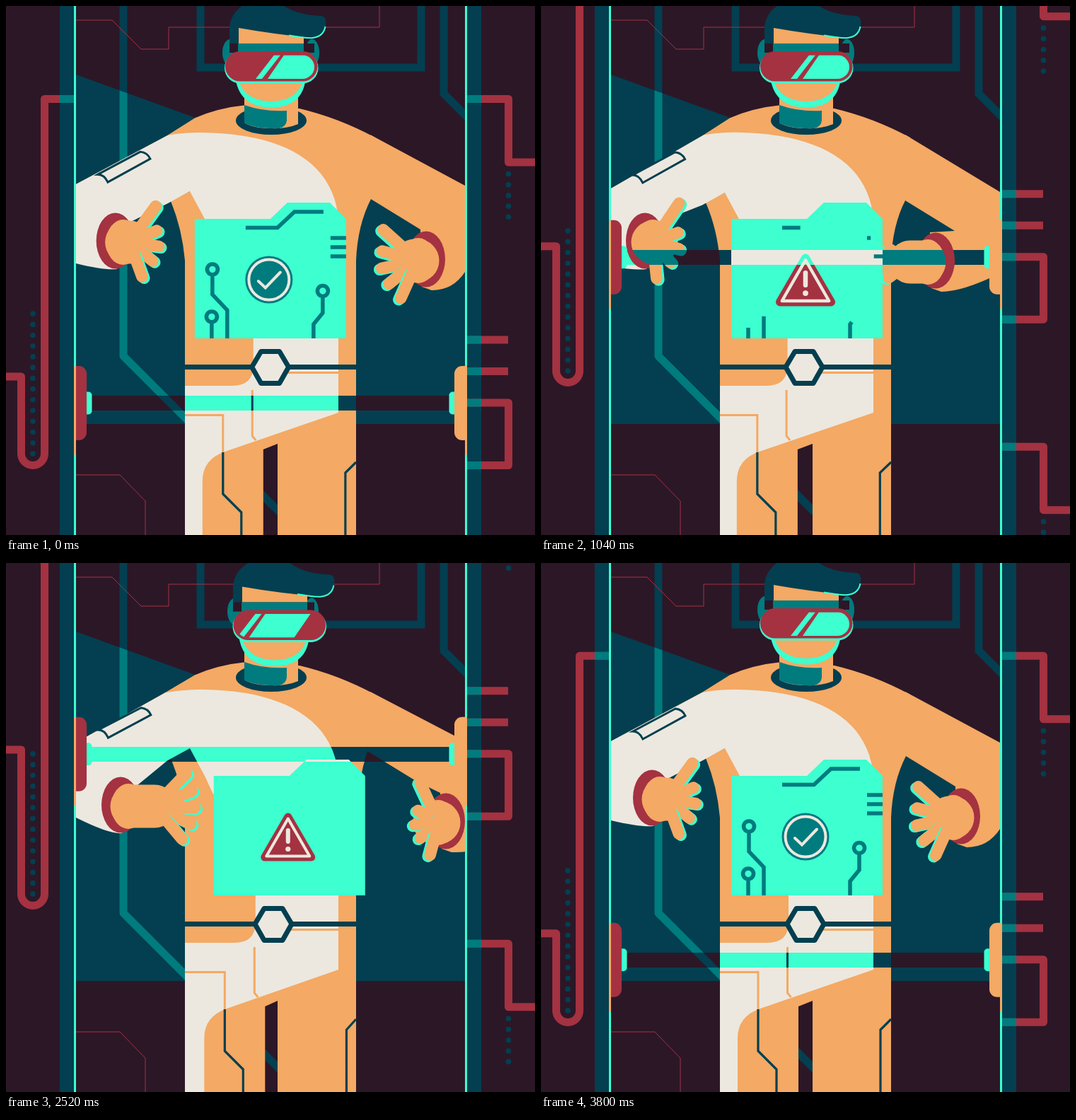
Write an HTML page with a canvas that moves like this. It is 748 px wide and 748 px high and loops after 3840 ms.

```html
<!DOCTYPE html>
<html lang="en">
<head>
<meta charset="utf-8">
<title>Scanner</title>
<style>
html, body { margin: 0; width: 100%; height: 100%; overflow: hidden; background: #2c1727; }
canvas { display: block; width: 748px; height: 748px; }
</style>
</head>
<body>
<canvas id="stage" width="748" height="748"></canvas>
<script>
const c = document.getElementById('stage').getContext('2d');
const LOOP = 3840, HALF = LOOP / 2;

const BASE = {
  bg: '#2c1727', dark: '#033f50', ink: '#033f50', teal: '#007b7e', pipe: '#007b7e',
  mint: '#3dffd0', rim: '#3dffd0', orange: '#f4a964', skin: '#f4a964',
  white: '#ece8df', mark: '#ece8df', red: '#a43241', sign: '#a43241'
};
// Colours as seen through the scan beam
const BEAM = { ...BASE, dark: BASE.bg, pipe: BASE.dark, white: BASE.mint, orange: BASE.dark,
  skin: BASE.teal, rim: BASE.teal, mint: BASE.white, sign: BASE.mint };
let P = BASE;

// Smooth 0 to 1 while u runs from a to b
function ramp(u, a, b) {
  const p = Math.min(1, Math.max(0, (u - a) / (b - a)));
  return p * p * (3 - 2 * p);
}

// cubic-bezier(.5, 0, .5, 1)
function ease(x) {
  let lo = 0, hi = 1;
  for (let i = 0; i < 24; i++) {
    const s = (lo + hi) / 2;
    if (1.5 * s * (1 - s) + s * s * s < x) lo = s; else hi = s;
  }
  return lo * lo * (3 - 2 * lo);
}

// State of one swipe cycle: rest, wind up, swipe, land, scan, rest
function pose(u) {
  const lean = ramp(u, -40, 150) - ramp(u, 150, 360);
  const swipe = ramp(u, 150, 360) - ramp(u, 360, 600);
  const land = ramp(u, 360, 600) - ramp(u, 600, 1040);
  const scan = ramp(u, 600, 1040) - ramp(u, 1040, 1270);
  const mix = (rest, a, b, d) => rest + (a - rest) * swipe + (b - rest) * land + (d - rest) * scan;
  return {
    slide: 500 * ramp(u, 150, 556) - 18 * ramp(u, -40, 150) - 26 * ramp(u, 556, 900),
    turn: ramp(u, 150, 330) - ramp(u, 640, 950),
    glint: 84 + 14 * ramp(u, 150, 360) - 52 * ramp(u, 380, 600) + 38 * ramp(u, 600, 1000),
    warn: 1 + .12 * ramp(u, 960, 1080) - 1.12 * ramp(u, 1080, 1160),
    check: 1.12 * ramp(u, 1130, 1230) - .12 * ramp(u, 1230, 1400),
    drawn: 1 - Math.pow(1 - Math.min(1, Math.max(0, (u - 940) / 780)), 1.75),
    hip: mix(0, 17, 4, -2) - 3 * lean,
    armL: { top: mix(252, 240, 254, 258), low: mix(364, 380, 360, 368), pit: [260, mix(262, 258, 262, 264)] },
    armR: { top: mix(254, 243, 252, 263), low: mix(376, 360, 405, 378),
      pit: [mix(516, 503, 511, 515), mix(273, 260, 266, 275)] },
    left: { x: mix(157, 205, 162, 147) - 20 * lean, y: mix(332, 362, 342, 332), palm: mix(20, 72, 48, 11),
      aim: mix(8, 14, 2, 14), spread: mix(31, 24, 24, 35), len: mix(42, 59, 57, 38) },
    right: { x: mix(594, 690, 622, 558), y: mix(358, 360, 365, 360), palm: mix(12, 14, 10, 36),
      aim: mix(12, 12, 5, 2), spread: mix(27, 27, 35, 17), len: mix(52, 50, 34, 40) }
  };
}

function fill(d, col) { c.fillStyle = P[col]; c.fill(new Path2D(d)); }
function stroke(d, col, w) { c.strokeStyle = P[col]; c.lineWidth = w; c.stroke(new Path2D(d)); }
function rect(x, y, w, h, col, r = 0) {
  c.fillStyle = P[col];
  c.beginPath(); c.roundRect(x, y, w, h, r); c.fill();
}
function oval(x, y, rx, ry, col) {
  c.fillStyle = P[col];
  c.beginPath(); c.ellipse(x, y, rx, ry, 0, 0, 7); c.fill();
}
function seg(x1, y1, x2, y2, col, w) {
  c.lineCap = 'round';
  stroke(`M${x1} ${y1}L${x2} ${y2}`, col, w);
  c.lineCap = 'butt';
}
function clipped(d, draw) {
  c.save(); c.clip(new Path2D(d)); draw(); c.restore();
}

function room() {
  const cone = 'M99 97L649 296V591H99Z', duct = 'M166 0V495L420 749';
  rect(0, 0, 748, 748, 'bg');
  fill(cone, 'dark');
  stroke(duct, 'dark', 11);
  clipped(cone, () => stroke(duct, 'pipe', 11));
  c.lineJoin = 'miter';
  stroke('M275 0V87H587V0M619 0V124L652 157', 'ink', 11);
  stroke('M99 20H150L191 61H230V30H528V0M99 663H161L197 700V748', 'red', 1);
}

function figure({ hip: h, armL, armR, left, right }) {
  const [ax, ay] = armL.pit, [bx, by] = armR.pit;
  const g = h * .58, gap = 364 + g;
  const sx = 228 - h * .9, sy = 183 + h * .2;

  // Suit
  fill(`M253 748V360Q249 315 ${ax - 27} ${ay + 14}L${ax} ${ay}L${sx} ${sy}L268 158Q300 144 340 140L415 145
    Q470 158 522 186L${bx} ${by}Q497 310 495 360V748H384V619L${gap} 627V748Z`, 'orange');
  fill(`M99 ${armL.top}L${sx} ${sy}L268 158L${ax} ${ay}Z`, 'orange');
  fill(`M515 182L649 ${armR.top}V${armR.low}Q${right.x + 38} ${right.y + 44} ${right.x + 8} ${right.y + 44}
    L${right.x - 6} ${right.y + 39}L${right.x - 8} ${right.y - 40}L${bx + 70} ${by + 43}L${bx} ${by}Z`, 'orange');

  // White panel with sleeve
  const q = 350 + h * .7;
  fill(`M99 ${armL.top}L${sx} ${sy}C262 176 320 178 362 189C428 206 466 245 470 302V575L${310 + g} 630
    Q${278 + g} 641 ${278 + g} 672V748H253V537H${q - 30}Q${q} 537 ${q} 508V465C${q} 400 ${q - 35} 385 ${ax + 22} ${ay + 41}
    L${ax} ${ay}L${ax - 32} ${ay + 17.5}L${left.x + 24} ${left.y - 28}L${left.x + 2} ${left.y + 40}
    Q${left.x - 15} ${left.y + 42} 99 ${armL.low}Z`, 'white');

  // Sleeve badge
  c.save();
  c.translate(167 + h * .18, 227 - h * .4);
  c.rotate(h * .003);
  c.lineJoin = 'miter';
  stroke('M-37 11L23 -21Q33 -20 37 -11L-23 22Q-28 11 -37 11Z', 'ink', 3);
  c.restore();

  // Belt and seams
  const m = 374 + h, s = 348.5 + h * .7, l = 307 + g;
  const hex = `M${m - 26} 510.5L${m - 13} 488.5H${m + 13}L${m + 26} 510.5L${m + 13} 533.5H${m - 13}Z`;
  stroke(`M${m} 518.5H470`, 'orange', 3);
  stroke('M253 510.5H495', 'ink', 7);
  fill(hex, 'white');
  c.lineJoin = 'round';
  stroke(hex, 'ink', 7);
  c.lineJoin = 'miter';
  stroke(`M${s} 543V608L${s + 5} 614M253 578.5H${l}V631`, 'orange', 3);
  stroke(`M${l} 631V690L${l + 26} 716V748M${480 + h * .36} 748V660L495 645`, 'ink', 3.2);
}

function head(k, glint) {
  oval(375, 162, 50, 20, 'ink');
  fill('M337 125H413V167Q396 174 375 173Q350 173 337 165Z', 'skin');
  fill('M337 140Q365 150 397 148V162Q396 171 386 173Q352 174 337 165Z', 'teal');
  c.save();
  c.translate(5 * k, 2.5 * k);
  oval(317 + 2 * k, 66, 11, 19, 'teal');
  oval(433 - 6 * k, 66, 10, 19, 'teal');
  fill('M324 98H424Q422 143 375 143.5Q328 143 324 98Z', 'mint');
  fill('M328 28H421V102Q414 134 375 135Q336 134 328 102Z', 'skin');
  const f = 7 * k;
  fill(`M316 66V30Q318 8 340 -4H${388 + f}Q${408 + f} 13 ${446 + f} 14Q${454 + f} 15 ${452 + f} 28
    Q${449 + f} 45 ${432 + f} 45Q380 40 329 31V66Z`, 'ink');
  stroke(`M${400 + f} 41.5Q${425 + f} 46 ${434 + f} 45Q${449 + f} 43 ${451.5 + f} 29`, 'mint', 2);
  rect(316, 53, 120 - 5 * k, 13, 'bg');
  rect(328, 53, 93, 13, 'teal');
  c.translate(309 + 6.5 * k, 64);
  rect(0, 1.5, 132.5, 44, 'mint', 22);
  rect(1, 0, 130.5, 42.5, 'red', 21);
  c.beginPath(); c.roundRect(5, 5.5, 122, 33.5, 17); c.clip();
  fill(`M${glint} 5.5h64l-23 33.5h-64Z M${glint - 14} 5.5h9l-26 33.5h-9Z`, 'mint');
  c.restore();
}

// Fingers fan out evenly around the aim; a wide spread stretches the outer ones
function hand({ x, y, palm, aim, spread, len }, dir) {
  c.save();
  c.translate(x, y);
  c.scale(dir, 1);
  oval(0, 0, 27, 39.5, 'red');
  oval(11, 2, 24, 32, 'skin');
  seg(16, 2, palm, 2, 'skin', 61);
  for (let i = -2; i <= 2; i++) {
    const a = (aim + i * spread) * Math.PI / 180;
    const r = len + (Math.abs(i) === 2 ? (spread - 20) * (i < 0 ? 1.9 : .9) : 0);
    const dx = Math.cos(a), dy = Math.sin(a);
    const bx = palm + dx * 20, by = 2 + dy * 20, tx = palm + dx * r, ty = 2 + dy * r;
    seg(bx + 3, by + 2, tx + 3, ty + 2, 'rim', 16.5);
    seg(bx, by, tx, ty, 'skin', 16.5);
  }
  c.restore();
}

function trace(d, len, p) {
  if (p <= 0) return;
  c.setLineDash([len * Math.min(1, p), len * 2]);
  stroke(d, 'teal', 5.5);
  c.setLineDash([]);
}

function badge(size, draw) {
  if (size <= 0) return;
  c.save(); c.translate(105, 387); c.scale(size, size); draw(); c.restore();
}
function tick() {
  oval(0, 0, 33.5, 33.5, 'teal');
  c.lineJoin = 'miter';
  c.strokeStyle = P.mark; c.lineWidth = 4;
  c.beginPath(); c.arc(0, 0, 28.5, 0, 7); c.stroke();
  c.lineCap = 'round';
  stroke('M-15 2L-5 11.5L16 -10.5', 'mark', 4);
  c.lineCap = 'butt';
}
function alarm() {
  const tri = 'M0 -28L33 29H-33Z';
  c.lineJoin = 'round';
  stroke(tri, 'sign', 11);
  fill(tri, 'sign');
  stroke('M0 -25.5L30.5 27.5H-30.5Z', 'mark', 4);
  seg(0, -9, 0, 7, 'mark', 6);
  oval(0, 17.5, 3.6, 3.6, 'mark');
}

function folder(x, warn, check, p) {
  if (x > 650 || x < -120) return;
  c.save();
  c.translate(x, 0);
  fill('M0 301H107L131 278H191L214 301V470H0Z', 'mint');
  c.lineJoin = 'miter';
  trace('M72 313.5H117L141 291H182', 119, p);
  trace('M192 328H214', 22, p * 1.1);
  trace('M192 341H214', 22, p * 2 - 1);
  trace('M214 354H192', 22, p * 2.6);
  trace('M46 470V430L25 408V380A7.5 7.5 0 1 1 25.1 380', 145, p);
  trace('M24 470V447A7.5 7.5 0 1 1 24.1 447', 70, p);
  trace('M168 470V450L181 434V410.5A7.5 7.5 0 1 1 181.1 410.5', 111, p);
  badge(warn, alarm);
  badge(check, tick);
  c.restore();
}

function scene(s) {
  room();
  figure(s);
  head(s.turn, s.glint);
  hand(s.left, 1);
  hand(s.right, -1);
  folder(269 + s.slide, 0, 1, 1);
  folder(269 + s.slide - 456, s.warn, s.check, s.drawn);
}

function pipes(d) {
  const leg = 524 - d * .893, bend = 633 - d * .567, top = 131.5 - d;
  let path = `M97 ${top}H54.5V${bend}A16.5 16.5 0 0 1 21.5 ${bend}V${leg}H0`;
  for (const y of [top, top + 698]) path += `M652 ${y}H710.5V${y + 89.5}H748`;
  path += `M652 ${472 - d}H710M652 ${516.5 - d}H710M652 ${561 - d}H710.5V${649.5 - d}H652`;
  c.lineJoin = 'round';
  stroke(path, 'red', 11);
  clipped('M76 0H97V748H76ZM652 0H672V748H652Z', () => stroke(path, 'teal', 11));
  for (let i = 0; i < 14; i++) oval(38, 435 - d * .567 + i * 15.23, 3.8, 3.8, 'ink');
  for (let i = 0; i < 5; i++)
    for (const y of [0, 698]) oval(710.5, 237.5 + y - d + i * 15.2, 3.8, 3.8, 'ink');
}

function frame(d) {
  for (const [side, column, line] of [[0, 76, 96], [651, 651, 649]]) {
    rect(side, 0, 97, 748, 'bg');
    rect(column, 0, 21, 748, 'ink');
    rect(line, 0, 3, 748, 'mint');
  }
  pipes(d);
  const y = 561.5 - d;
  for (const x of [96, 649]) {
    rect(x, 0, 3, 748, 'mint');
    rect(x, y - 52, 3, 125, 'orange');
  }
  rect(99, y - 52.5, 15, 105, 'red', [0, 11, 11, 0]);
  rect(634, y - 52.5, 18, 105, 'orange', [11, 0, 0, 11]);
  rect(114, y - 16, 7.5, 32, 'mint', [0, 5, 5, 0]);
  rect(626.5, y - 16, 7.5, 32, 'mint', [5, 0, 0, 5]);
}

function render(t) {
  const u = t % HALF, s = pose(u >= HALF - 40 ? u - HALF : u);
  const d = 353.5 * ease(1 - Math.abs(1 - t / HALF));
  const beam = Math.round(551 - d);
  P = BASE;
  scene(s);
  P = BEAM;
  clipped(`M114 ${beam}H634v21H114Z`, () => scene(s));
  P = BASE;
  frame(d);
}

function loop() {
  render(performance.now() % LOOP);
  requestAnimationFrame(loop);
}
loop();
</script>
</body>
</html>
```
